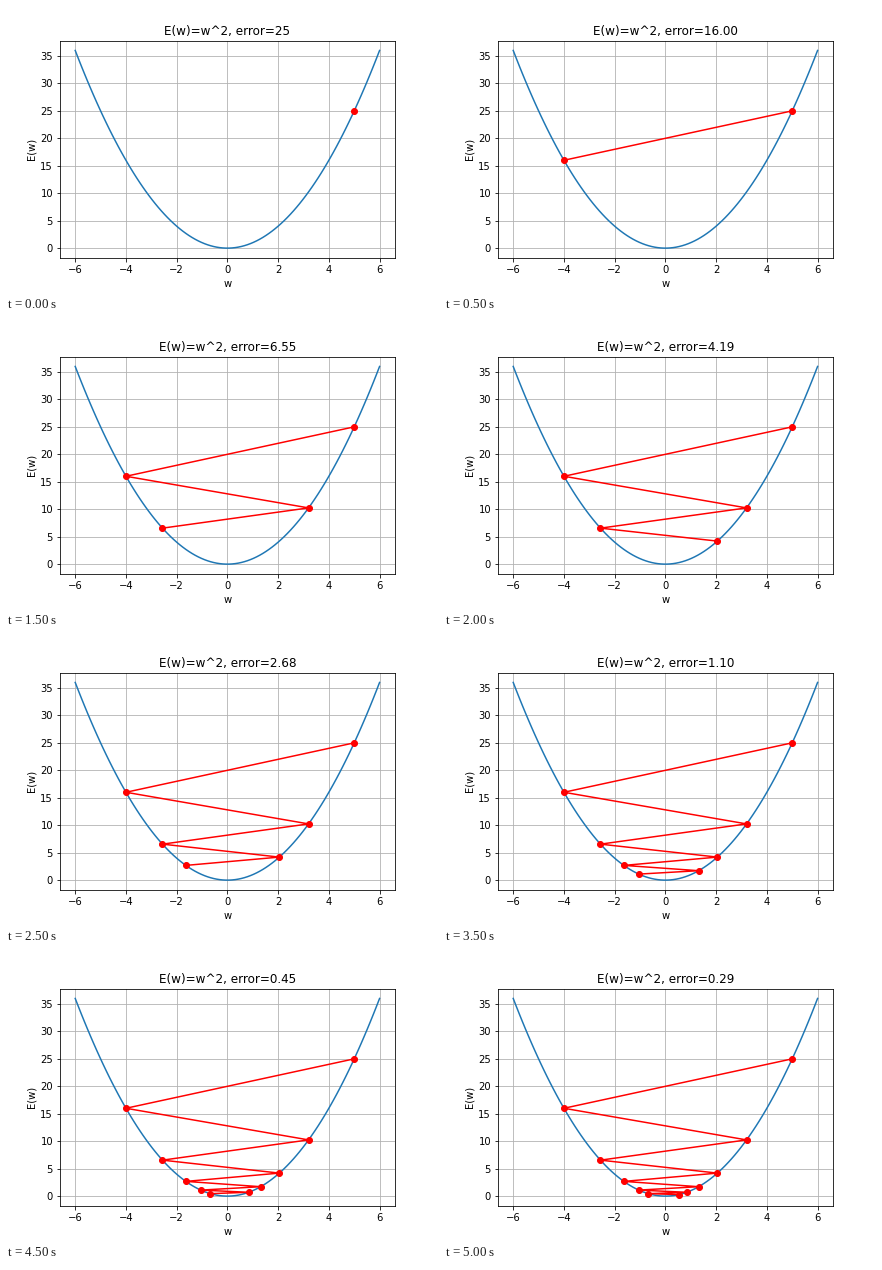
These frames come from a looping animation (432 px wide and 288 px high, 5500 ms). A matplotlib script:

```python
import numpy as np
import matplotlib.pyplot as plt
from matplotlib.animation import FuncAnimation

STEPS = 11
INTERVAL = 500  # ms per descent step
W0, LEARNING_RATE = 5, 0.9

plt.rcParams.update({"font.family": "DejaVu Sans", "font.size": 10})


def error(w):
    return w ** 2


# Gradient descent on w^2: each update multiplies w by (1 - 2 * rate).
path = W0 * (1 - 2 * LEARNING_RATE) ** np.arange(STEPS)

fig, ax = plt.subplots(figsize=(6, 4), dpi=72)
fig.subplots_adjust(left=0.125, right=0.9, bottom=0.125, top=0.88)

w = np.linspace(-6, 6, 100)
ax.plot(w, error(w))
ax.set_xlabel("w")
ax.set_ylabel("E(w)")
ax.grid(True)
title = ax.set_title("")
trail, = ax.plot([], [], "ro-")


def update(step):
    seen = path[:step + 1]
    trail.set_data(seen, error(seen))
    value = f"{error(seen[-1]):.2f}" if step else f"{error(W0)}"
    title.set_text(f"E(w)=w^2, error={value}")
    return trail, title


anim = FuncAnimation(fig, update, frames=STEPS, interval=INTERVAL,
                     repeat=True, repeat_delay=0, blit=False)
plt.show()
```
